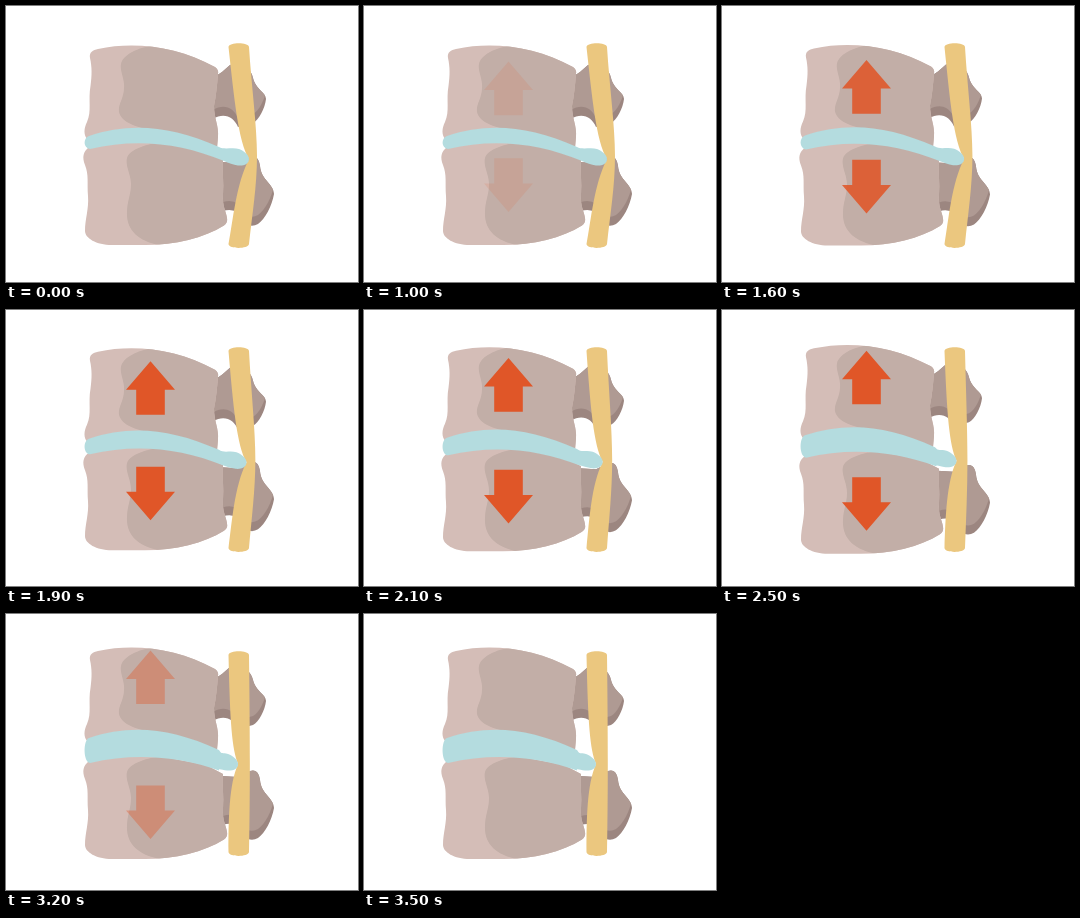
Recreate the animation shown at these times as an HTML page with a canvas. Size 352 px wide and 276 px high, loop 8.5 s.

```html
<!DOCTYPE html>
<html lang="en">
<head>
<meta charset="utf-8">
<title>Spinal decompression</title>
<style>
html, body { margin: 0; width: 100%; height: 100%; overflow: hidden; background: #fff; }
canvas { display: block; width: 352px; height: 276px; }
</style>
</head>
<body>
<canvas id="stage"></canvas>
<script>
const W = 352, H = 276, LOOP = 8500, STEP = 100;
const LIFT = 6, SHADE = 9, TRAVEL = 19.2;
const canvas = document.getElementById('stage');
const ctx = canvas.getContext('2d');
const dpr = window.devicePixelRatio || 1;
canvas.width = W * dpr;
canvas.height = H * dpr;

const color = {
  light: '#d4bdb7', body: '#c2aea7', process: '#af9a93', shade: '#9c8680',
  disc: '#b4dcdf', ligament: '#ebc77f', arrow: '#e05628'
};

const path = d => new Path2D(d);

const upper = {
  body: path('M84 52C83 46 87 44 92 43C130 35 172 41 209 61Q213 64 212 68C211 80 210 90 208 100C208 112 213 120 212 131L211 142L150 134L82 134C77 129 78 122 81 116C86 105 82 94 84.5 80C86 69 86 61 84 52Z'),
  front: path('M156 39C138 39 121 46 116 55C112 63 119 72 118 82C118 92 112 98 113 106C115 116 131 123 156 125L230 150V36Z'),
  process: path('M210 70L216 66L224 59C238 57 245 63 247 72C250 84 260 86 260 93C259 102 253 114 247 117L232 121C228 111 218 106 207 113Z')
};

const lower = {
  body: path('M79 159C76 151 77 146 83 141L130 132L200 145L217 154C216 166 218 177 217 188C216 200 220 205 221 212Q222 217 218 219.5C198 232 169 239 139 239H106C90 239 79 232 79 225C79 213 83 203 82 190C81 177 83 169 79 159Z'),
  front: path('M158 136C140 138 124 143 121 152C119 160 125 168 125 178C125 189 121 195 121 206C120 225 134 237 160 240H240V136Z'),
  process: path('M215 156L232 157L244 151C250 149 253 153 254 160C255 174 268 178 268 188C266 200 259 213 252 218Q247 221 242 219L232 207Q226 202 217 205Z')
};

const arrowShape = path('M0 0L24.5 28.5H14.3V53.7H-14.3V28.5H-24.5Z');

// k runs from 0 (herniated) to 1 (relieved)
const tip = k => ({ x: 243 - 11 * k, y: 153 - 3 * k });

function disc(k) {
  const { x, y } = tip(k), up = LIFT * k;
  return path(`M83 ${130 - up}
    C125 ${116 - up} 165 ${120 - up} 213 ${141 - 5 * k}
    C${218 - 2 * k} ${144 - 3 * k} ${x - 16} ${y - 12} ${x - 10} ${y - 10}
    C${x - 5} ${y - 8} ${x} ${y - 4} ${x} ${y}
    C${x} ${y + 5} ${x - 5} ${y + 7} ${x - 11} ${y + 6.5}
    C${x - 16} ${y + 6} ${x - 20} ${y + 4} ${218 - 5 * k} ${155 + 1.5 * k}
    C175 ${137 + up} 130 ${132 + up} 84 ${143 + up}
    C77 ${142 + up} 77 ${132 - up} 83 ${130 - up}Z`);
}

function ligament(k) {
  const { x, y } = tip(k), back = 251 - 7.2 * k;
  return path(`M222.5 41C223 36 242.5 36 243 41
    C${245.5 - 2 * k} 80 ${back} 120 ${back} 150
    C${back} 180 ${246 - 2.5 * k} 210 243 238
    C242 243.2 223 243.2 222.5 238
    C${227 - 4.5 * k} ${215 - 10 * k} ${230 - 7 * k} ${178 - 8 * k} ${x} ${y}
    C${232 - 6 * k} 135 ${228 - 4 * k} ${90 + 20 * k} 222.5 41Z`);
}

const clamp = v => Math.min(1, Math.max(0, v));
const span = (t, from, to) => clamp((t - from) / (to - from));
const ease = u => u < 0.5 ? 4 * u ** 3 : 1 - 4 * (1 - u) ** 3;

function fill(shape, style) {
  ctx.fillStyle = style;
  ctx.fill(shape);
}

function clipped(shape, paint) {
  ctx.save();
  ctx.clip(shape);
  paint();
  ctx.restore();
}

// The process gets its shaded underside from a raised copy of itself
function vertebra(bone, dy) {
  ctx.save();
  ctx.translate(0, dy);
  fill(bone.process, color.shade);
  clipped(bone.process, () => {
    ctx.translate(0, -SHADE);
    fill(bone.process, color.process);
  });
  fill(bone.body, color.light);
  clipped(bone.body, () => fill(bone.front, color.body));
  ctx.restore();
}

function arrow(y, dir, alpha) {
  ctx.save();
  ctx.globalAlpha = alpha;
  ctx.translate(144.5, y);
  ctx.scale(1, dir);
  fill(arrowShape, color.arrow);
  ctx.restore();
}

function draw(t) {
  const k = ease(span(t, 900, 3500));
  const alpha = span(t, 900, 1700) - span(t, 2700, 3500);
  ctx.setTransform(dpr, 0, 0, dpr, 0, 0);
  ctx.fillStyle = '#fff';
  ctx.fillRect(0, 0, W, H);
  vertebra(upper, -LIFT * k);
  vertebra(lower, LIFT * k);
  fill(ligament(k), color.ligament);
  fill(disc(k), color.disc);
  arrow(55.5 - TRAVEL * k, 1, alpha);
  arrow(206 + TRAVEL * k, -1, alpha);
}

const start = performance.now();
function tick() {
  const t = (performance.now() - start) % LOOP;
  draw(Math.floor(t / STEP) * STEP);
  requestAnimationFrame(tick);
}
tick();
</script>
</body>
</html>
```
